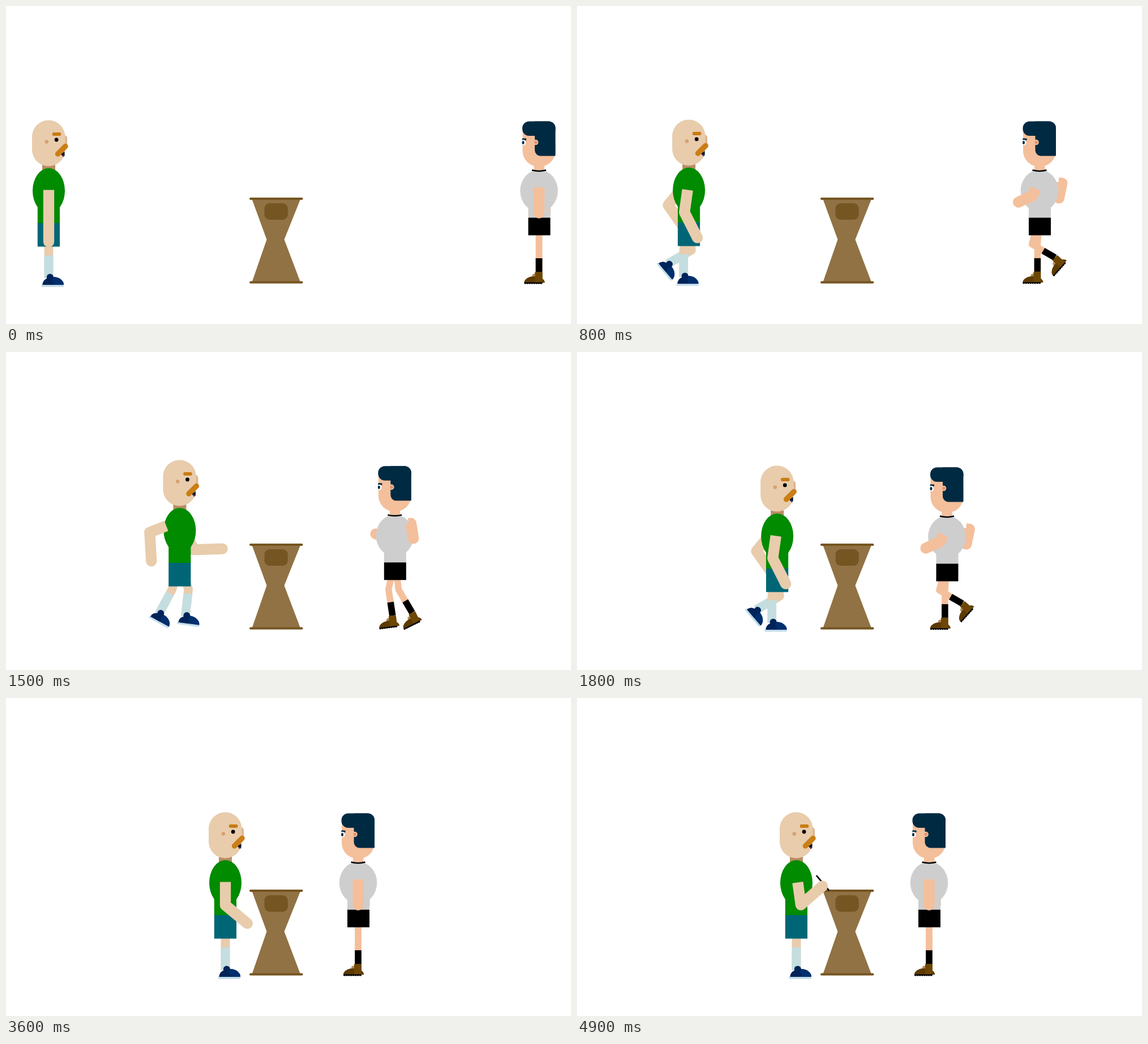
Recreate the animation shown at these times as an HTML page with a canvas. Size 998 by 561 pixels, loop 5000 ms.

```html
<!DOCTYPE html>
<html>
<head>
<meta charset="utf-8">
<style>
html, body { margin: 0; height: 100%; overflow: hidden; background: #fff; }
canvas { display: block; }
</style>
</head>
<body>
<canvas id="stage" width="998" height="561"></canvas>
<script>
const ctx = document.getElementById('stage').getContext('2d');
const TAU = Math.PI * 2;
const rad = deg => deg * Math.PI / 180;

// Angles are measured from straight down; positive swings forward (+x).
const reach = ([x, y], deg, len) =>
  [x + len * Math.sin(rad(deg)), y + len * Math.cos(rad(deg))];

function box(color, x, y, w, h, r = 0) {
  ctx.fillStyle = color;
  ctx.beginPath();
  ctx.roundRect(x, y, w, h, r);
  ctx.fill();
}
function oval(color, x, y, rx, ry = rx, from = 0, to = TAU) {
  ctx.fillStyle = color;
  ctx.beginPath();
  ctx.ellipse(x, y, rx, ry, 0, from, to);
  ctx.fill();
}
function shape(color, points) {
  ctx.fillStyle = color;
  ctx.beginPath();
  points.forEach(p => ctx.lineTo(...p));
  ctx.fill();
}
function line(color, width, points, cap = 'butt') {
  ctx.strokeStyle = color;
  ctx.lineWidth = width;
  ctx.lineCap = cap;
  ctx.lineJoin = 'round';
  ctx.beginPath();
  points.forEach(p => ctx.lineTo(...p));
  ctx.stroke();
}

// Walk cycle of ten steps, keyed at phases 1, 3, 6 and 8.
const KEYS = [1, 3, 6, 8];
function cycle(values, n) {
  const p = (n + 9) % 10 + 1;
  const i = KEYS.findLastIndex(k => k <= p);
  const at = j => values[(j + 4) % 4];
  const span = i % 2 ? 3 : 2;
  const u = (p - KEYS[i]) / span;
  const m0 = (at(i + 1) - at(i - 1)) / 5 * span;
  const m1 = (at(i + 2) - at(i)) / 5 * span;
  return (2 * u ** 3 - 3 * u * u + 1) * at(i) + (u ** 3 - 2 * u * u + u) * m0
    + (3 * u * u - 2 * u ** 3) * at(i + 1) + (u ** 3 - u * u) * m1;
}

const bald = {
  skin: '#e8ccac', shoulder: 308.5, upper: 57, fore: 50.5, sleeve: 16, farShift: 0,
  hip: 383, thigh: 49, shin: 48, legWidth: 15.5, sock: '#c4dedf', sockFrom: 8,
  arm: [[28, -40, -69, -8], [109, 35, -2, 27]],
  leg: [[-14, 5, 19, -11], [-42, -60, 16, 0], [42, 50, -10, 0]],
  shoe() {
    box('#c4dde8', -13, 11.5, 39.5, 4, 1.5);
    oval('#002f6d', 8, 12, 18.5, 14, Math.PI, TAU);
    oval('#00245a', -1, 12, 10, 11, Math.PI, TAU);
    oval('#00245a', 2.3, -1.5, 6);
  },
  body() {
    box('#b98c64', -11.5, 276, 23, 18);
    oval('#008b00', 0, 326, 28.5, 40);
    box('#008b00', -19.7, 340, 39.2, 44);
    box('#006676', -19.7, 383, 39.2, 41.5);
    box('#e0b48c', 22, 228, 10.5, 20, 5);
    box(this.skin, -29.5, 201.5, 58.5, 81, 29);
    oval('#d6a070', -3.7, 239.5, 3.2);
    box('#c97c14', 6.3, 223, 15.5, 6, 2.5);
    oval('#000', 13.6, 236, 3.4);
    shape('#001a33', [[21, 261], [28, 257], [28, 264], [25.5, 266.5]]);
    shape('#c8325a', [[23.5, 264], [26.5, 263], [25.5, 266.5]]);
    line('#cb7e15', 9.5, [[16, 261], [29.5, 247.5]], 'round');
  }
};

const haired = {
  skin: '#f4bf9b', shoulder: 309, upper: 29, fore: 27, sleeve: 11, farShift: -11,
  hip: 370, thigh: 52, shin: 47, legWidth: 11.5, sock: '#000', sockFrom: 23,
  arm: [[26, -83, -85, 26], [108, 12, -3, 66]],
  leg: [[-9, 15, 9, 4], [-45, -60, 13, 0], [38, 48, -10, 0]],
  shoe() {
    oval('#b08a5a', 8, 7.5, 4);
    oval('#5c3a00', 8, 19, 18, 11, Math.PI, TAU);
    box('#6d4604', -6, 0, 13, 19, 1);
    box('#000', -6, 18.5, 32, 2);
    for (let x = -5; x < 24; x += 4) box('#000', x, 20, 2.5, 1.3);
  },
  body() {
    box(this.skin, -9.5, 276, 18.5, 18);
    oval('#cecece', 0, 326, 33.3, 37);
    box('#cecece', -20, 345, 39, 29);
    box('#000', -20, 373.5, 39, 31);
    ctx.strokeStyle = '#000';
    ctx.lineWidth = 2.5;
    ctx.beginPath();
    ctx.moveTo(-12.5, 289.5);
    ctx.quadraticCurveTo(0, 293, 12.5, 289.5);
    ctx.stroke();
    box(this.skin, -29, 215, 58, 68.5, 28);
    box(this.skin, 0, 220, 29, 28);
    const hair = '#002a42';
    box(hair, -29, 203.5, 58.5, 25.5, 12);
    box(hair, -29, 203.5, 36.5, 61, [12, 0, 10, 1]);
    oval(this.skin, 6, 240.5, 4.8);
    oval('#dd9470', 5.7, 240.5, 2.8);
    line(hair, 3.5, [[22.5, 235.5], [29.5, 235]]);
    oval('#fff', 27, 241, 3.6, 5);
    oval(hair, 28, 241, 2, 3);
  }
};

function arm(man, x, upper, fore, pen) {
  const root = [x, man.shoulder];
  const elbow = reach(root, upper, man.upper);
  const hand = reach(elbow, fore, man.fore);
  const start = reach(root, upper, man.sleeve + 8 * Math.abs(rad(upper)));
  if (pen) {
    const [hx, hy] = hand;
    line('#000', 2.6, [[hx - 10, hy - 18], [hx + 11, hy + 7]], 'round');
  }
  line(man.skin, 19.3, [start, elbow, hand]);
  oval(man.skin, ...hand, 9.65);
}

function leg(man, thigh, shin, foot) {
  const hip = [0, man.hip];
  const knee = reach(hip, thigh, man.thigh);
  const ankle = reach(knee, shin, man.shin);
  line(man.skin, man.legWidth, [hip, knee, ankle]);
  line(man.sock, man.legWidth, [reach(knee, shin, man.sockFrom), ankle]);
  ctx.save();
  ctx.translate(...ankle);
  ctx.rotate(rad(foot));
  man.shoe();
  ctx.restore();
}

function drawMan(man, x, lift, dir, walking, n, pose, pen) {
  const angles = (tracks, phase) => tracks.map(v => walking ? cycle(v, phase) : 0);
  ctx.save();
  ctx.translate(x, -lift);
  ctx.scale(dir, 1);
  arm(man, man.farShift, ...angles(man.arm, n + 5));
  leg(man, ...angles(man.leg, n + 5));
  leg(man, ...angles(man.leg, n));
  man.body();
  arm(man, 0, ...(walking ? angles(man.arm, n) : pose), pen);
  ctx.restore();
}

function drawTable() {
  const dark = '#755521';
  shape('#917244', [[434.5, 341], [520, 341], [491.5, 412], [520, 487], [434.5, 487], [460.5, 412]]);
  for (const y of [340, 487.5]) line(dark, 4, [[432, y], [522.5, y]], 'round');
  box(dark, 456.5, 348, 41.3, 29, 9);
}

function draw(n) {
  const walking = n > 0 && n < 20;
  const wave = (shift, step = n) => Math.cos(TAU * (step - shift) / 5);
  let leftX = n ? 387.5 : 75.5, rightX = n ? 622 : 941.5, leftUp = 0, rightUp = 0;
  if (walking) {
    leftX = 75.5 + 15.6 * n - 2.6;
    rightX = 941.5 - 16.35 * n - 5.1 - 14.07 * wave(1);
    leftUp = 5.5 + 5.5 * wave(0);
    rightUp = 1.2 + 1.2 * wave(.5);
  }

  const greet = 134 * Math.max(0, 1 - Math.abs(n - 25) / 5);
  const raise = 131 * Math.min(1, Math.max(0, (n - 33.5) / 6.5));
  const writing = n >= 40;
  const stroke = .5 - .5 * Math.cos(Math.PI * n);
  const pose = writing ? [8 * stroke, 140 - 9 * stroke] : [0, greet + raise];

  ctx.clearRect(0, 0, 998, 561);
  drawTable();
  drawMan(haired, rightX, rightUp, -1, walking, n, [0, greet]);
  drawMan(bald, leftX, leftUp, 1, walking, n, pose, writing);
}

// The motion advances ten times a second.
const begin = performance.now();
function tick() {
  draw(Math.floor((performance.now() - begin) % 5000 / 100));
  requestAnimationFrame(tick);
}
tick();
</script>
</body>
</html>
```
